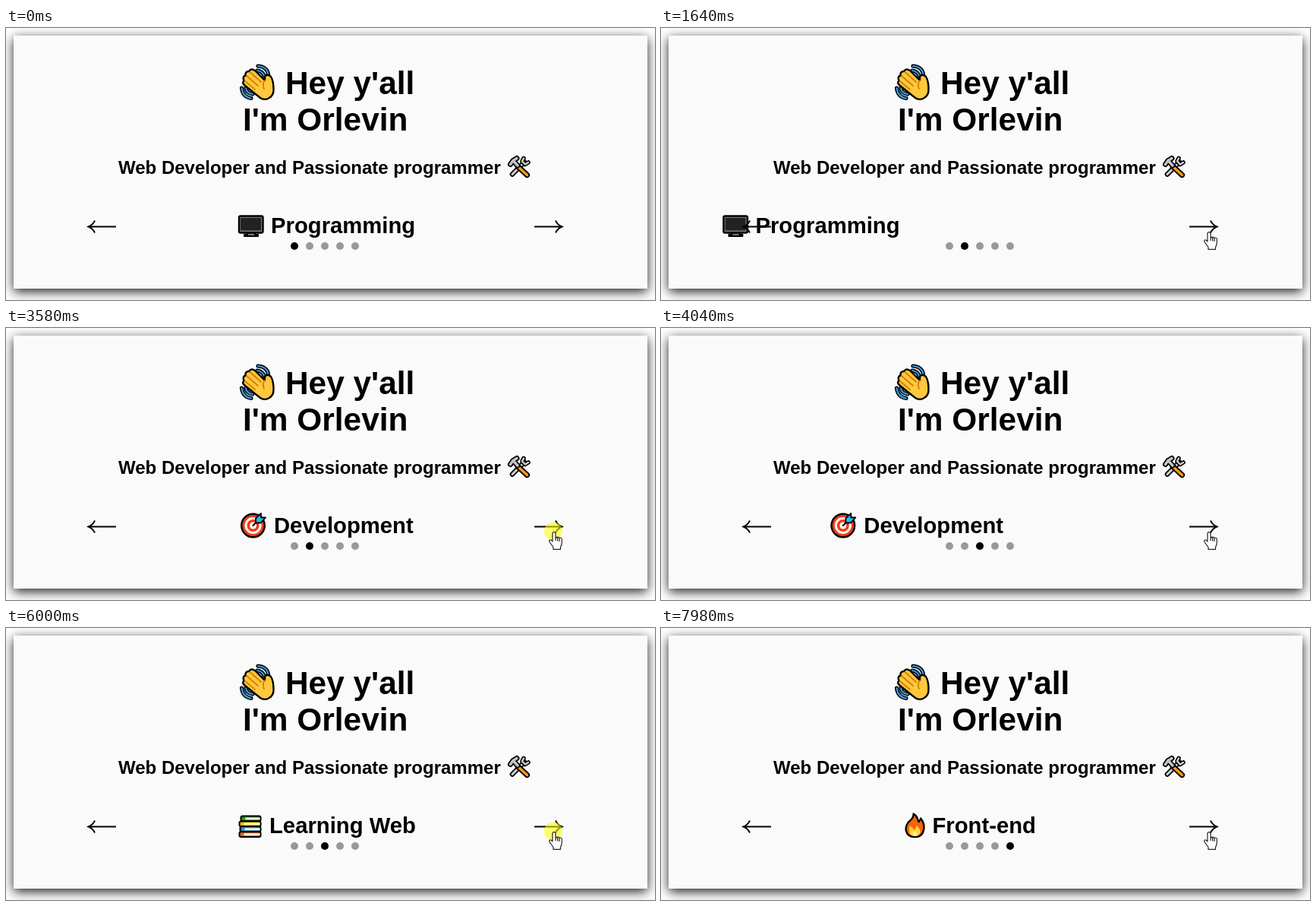
These frames come from a looping animation (855x358 px, 8000 ms). An HTML page:

```html
<!DOCTYPE html>
<html lang="en">
<head>
<meta charset="utf-8">
<title>Intro card</title>
<style>
  html, body { margin: 0; width: 100%; height: 100%; overflow: hidden; background: #fff; }
  .card {
    position: absolute; left: 10px; top: 10px; width: 835px; height: 333px;
    background: #fafafa; box-shadow: 0 4px 14px rgba(0, 0, 0, .88);
  }
  svg { position: absolute; left: 0; top: 0; }
  text { font-family: "Liberation Sans", Arial, sans-serif; font-weight: bold; }
  .title { font-size: 42.4px; }
  .sub { font-size: 24px; }
  .slide text { font-size: 29.25px; }
  .icon { stroke: #000; stroke-width: 2.4; stroke-linejoin: round; stroke-linecap: round; }
</style>
</head>
<body>
<div class="card"></div>
<svg width="855" height="358" viewBox="0 0 855 358">
  <defs><clipPath id="view"><rect x="80" y="236" width="681" height="46"/></clipPath></defs>

  <text class="title" x="368" y="87">Hey y'all</text>
  <text class="title" x="312" y="134.5">I'm Orlevin</text>
  <text class="sub" x="148" y="192">Web Developer and Passionate programmer</text>

  <!-- waving hand -->
  <g id="wave"></g>
  <g class="icon">
    <path fill="#ffc83d" d="M335 92L315 76Q310 72 313.500 69.500Q311 64 315.500 62.500Q315 57 320 57Q323 52.500 328 56L341 69V64Q344 59.500 349 64Q352.500 70 352.500 80Q353 89 346 92.500Q340 95.500 335 92Z"/>
    <path fill="none" stroke="#d67d00" stroke-width="1.800" d="M315 70L328 81M317.500 63.500L332 76M322 58.500L336 71M341 69Q337 74 340 80"/>
  </g>

  <g id="tools"></g>

  <g clip-path="url(#view)">
    <g class="slide">
      <g class="icon">
        <path fill="#777" stroke-width="2" d="M318 268H328V272H332V274H314V272H318Z"/>
        <rect x="307" y="247.500" width="31.500" height="22" rx="2" fill="#777"/>
        <rect x="310" y="250.500" width="25.500" height="15.500" fill="#222" stroke="#222" stroke-width="1"/>
      </g>
      <text x="349" y="270">Programming</text>
    </g>
    <g class="slide">
      <g class="icon">
        <circle cx="325.500" cy="260" r="15.300" fill="#f03a17"/>
        <g stroke="none">
          <circle cx="325.500" cy="260" r="11" fill="#fff"/>
          <circle cx="325.500" cy="260" r="8" fill="#f03a17"/>
          <circle cx="325.500" cy="260" r="4.500" fill="#fff"/>
        </g>
        <path fill="none" stroke-width="2" d="M325.500 260L335 250"/>
        <path fill="#28b8f0" stroke-width="1.800" d="M329 256.500V250.500L336 244V249.500H342L335.500 256.500Z"/>
      </g>
      <text x="353" y="270">Development</text>
    </g>
    <g class="slide">
      <g id="books"></g>
      <text x="347" y="270">Learning Web</text>
    </g>
    <g class="slide">
      <g class="icon">
        <path fill="#f7630c" d="M345.500 244.500C352 248 350 252 352.500 255Q355 253 355 250.500C362 259 361 275 347.500 275C333 275 333 260 340.500 254C344 251 346 248 345.500 244.500Z"/>
        <path fill="#ffd23d" stroke="none" d="M341 260Q345 263 346 266Q349 264 349.500 260Q355 265 354.500 269Q353 274 347.500 274Q341 274 340 268Q339.500 264 341 260Z"/>
        <path fill="#fff0a0" stroke="none" d="M347 267Q351 270 350 273.500H345Q344 270 347 267Z"/>
      </g>
      <text x="370.400" y="270">Front-end</text>
    </g>
  </g>

  <g id="dots"></g>

  <g id="arrows" fill="none" stroke="#000" stroke-width="1.900">
    <path id="left" d="M110 261.500H145M117 253.500Q114.500 259 108.500 261.500Q114.500 264 117 269.500"/>
    <use href="#left" transform="translate(841 0) scale(-1 1)"/>
  </g>

  <circle id="press" cx="721" cy="267.500" r="12" fill="#ff0" fill-opacity=".57"/>
  <g id="cursor" fill="#fff" stroke="#222" stroke-width="1.200" stroke-linejoin="round">
    <path id="hand" d="M7 .7Q5 .7 5 2.700V13L3.200 11.200Q1.200 10.500 .7 12.300Q.7 13.300 2 15L6 20.500V23.300H15.500V20.500Q17.300 17.500 17.300 14V9.500Q17 8 15.500 8Q14.500 8 14 8.700Q13.500 7.200 12 7.200Q10.800 7.200 10.300 8Q10 6.800 9 6.500V2.700Q9 .7 7 .7ZM9 7V12M11.600 8V12.500M14 9V13"/>
    <path id="pointer" d="M6.500 .5V16.500L10 13L12.500 18.500L15 17.500L12.500 12H17.500Z"/>
  </g>
</svg>
<script>
const LOOP = 8000, PITCH = 681, LEAD = 50;
// first and last step of each slide change
const moves = [[1480, 1940], [3890, 4360], [6230, 6660], [7980, 8440]];
const presses = [[1180, 1480], [3580, 3890], [6000, 6230], [7370, 7980]];
const $ = id => document.getElementById(id);

function add(parent, tag, attrs) {
  const el = document.createElementNS("http://www.w3.org/2000/svg", tag);
  for (const k in attrs) el.setAttribute(k, attrs[k]);
  return parent.appendChild(el);
}

// a coloured line with a black rim
function rimmed(parent, d, color, width, rim = 1.8) {
  for (const [stroke, w] of [["#000", width + 2 * rim], [color, width]])
    add(parent, "path", { d, stroke, "stroke-width": w, fill: "none", "stroke-linecap": "round", "stroke-linejoin": "round" });
}

for (const d of ["M332 50Q344 51 345.500 61", "M331 56Q338 57 340 63",
                 "M310.500 79Q312 91 323 92.500", "M316 79Q317 86 325 87"])
  rimmed($("wave"), d, "#3a96dd", 2.2, 1.5);

const tools = $("tools");
rimmed(tools, "M667 192.500L683 176.500", "#d0d0d0", 3);
rimmed(tools, "M682 171.500L680 175.500L684 179.500L688 177", "#d0d0d0", 2.4, 1.6);
rimmed(tools, "M674 182L686.500 193.500", "#f59b14", 3.6);
rimmed(tools, "M664.500 179.500L668 174.500L673 171.500M668.500 175L674 181", "#c4c4c4", 3.4);

["#16a016", "#ffb900", "#2b95dc", "#f05a14"].forEach((color, i) => {
  const y = 247.5 + i * 6.9, x = 307.5 + [2, 0, 1, 0][i];
  const g = add($("books"), "g", { class: "icon" });
  add(g, "rect", { x, y, width: 335.5 - x, height: 6.7, rx: 2, fill: color, "stroke-width": 2 });
  add(g, "rect", { x: x + 6, y: y + 2, width: 328.5 - x, height: 2.8, fill: "#fff3cf", stroke: "none" });
});

const dots = [0, 1, 2, 3, 4].map(i => add($("dots"), "circle", { cx: 380 + 20 * i, cy: 287, r: 5 }));
const slides = [...document.querySelectorAll(".slide")];

const bez = (s, a, b) => 3 * (1 - s) * (1 - s) * s * a + 3 * (1 - s) * s * s * b + s ** 3;
function easeInOut(u) {
  let lo = 0, hi = 1;
  for (let i = 0; i < 20; i++) {
    const mid = (lo + hi) / 2;
    if (bez(mid, .42, .58) < u) lo = mid; else hi = mid;
  }
  return bez(lo, 0, 1);
}

// elapsed time snapped to one of n equal steps
const snap = (t, from, to, n) =>
  Math.min(n, Math.floor((t - from) * n / (to - from) + 1e-6)) * (to - from) / n;

function draw(t) {
  let pos = 0, active = 0;
  for (const [from, to] of moves) {
    if (t < from) break;
    active++;
    pos += easeInOut((snap(t, from, to, 6) + LEAD) / (to - from + LEAD));
  }
  slides.forEach((s, i) => s.setAttribute("transform", `translate(${((i - pos) * PITCH).toFixed(2)} 0)`));
  dots.forEach((d, i) => d.setAttribute("fill", i === active ? "#000" : "#999"));

  $("press").style.display = presses.some(([a, b]) => t >= a && t < b) ? "" : "none";

  const shown = t >= 500;
  $("cursor").style.display = shown ? "" : "none";
  if (!shown) return;
  const away = (1 - snap(t, 500, 1020, 7) / 520) ** 2;
  const over = away < .3;
  $("cursor").setAttribute("transform", `translate(${715 + 30 * away} ${268 + 57 * away})`);
  $("hand").style.display = over ? "" : "none";
  $("pointer").style.display = over ? "none" : "";
}

const start = performance.now();
function tick() {
  draw((performance.now() - start) % LOOP);
  requestAnimationFrame(tick);
}
tick();
</script>
</body>
</html>
```
